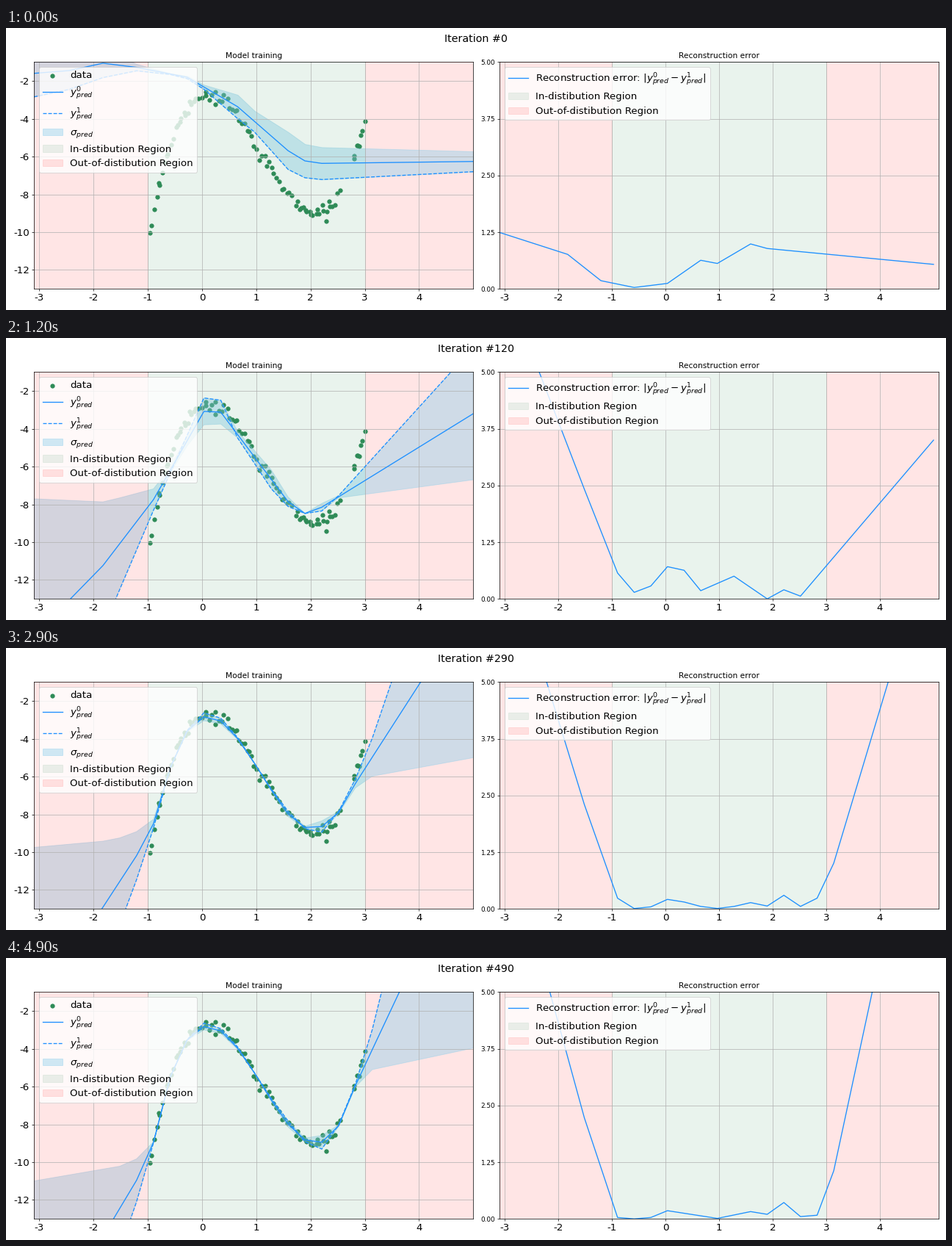
Write a matplotlib script that moves like this. It is 1280 px wide and 384 px high and loops after 5000 ms.

```python
import numpy as np
import matplotlib.pyplot as plt
from matplotlib.animation import FuncAnimation

FRAMES, STEP_MS = 50, 100
BLUE, GREEN, RED = "dodgerblue", "seagreen", "red"

plt.rcParams["font.family"] = "DejaVu Sans"
plt.rcParams["axes.unicode_minus"] = False

# The network is evaluated on 30 samples of [-4, 5]; the first two stay unseen
index = np.arange(2, 30)
grid = -4 + index * 9 / 29
inside = (grid > -0.7) & (grid < 1.8)


def cubic(x):
    """Curve behind the data: peak at 0.1, valley at 2.1."""
    return 4.65 * (x**3 / 3 - 1.1 * x**2 + 0.21 * x) - 2.85


def path(*points):
    """Polyline through (sample index, value) points."""
    return np.interp(index, *zip(*points))


def converged(x, low=-0.95, high=2.83):
    """The cubic where there is data, straight lines beyond it."""
    return (cubic(np.clip(x, low, high))
            + 4.8 * np.minimum(x - low, 0) + 6.1 * np.maximum(x - high, 0))


# Each stage: step, first prediction, signed gap to the second prediction
stages = [
    (0,
     path((2, -1.66), (5, -1.45), (7, -1.06), (9, -1.28), (12, -1.8),
          (15, -3.36), (18, -5.69), (19, -6.23), (20, -6.36), (29, -6.26)),
     path((2, -1.35), (7, -.76), (9, -.18), (11, -.03), (13, -.12),
          (15, -.63), (16, -.56), (18, -.99), (19, -.89), (29, -.54))),
    (3,
     path((2, -9.42), (7, -7.94), (10, -6.42), (13, -4.75), (14, -4.6),
          (15, -4.99), (18, -7.32), (19, -7.64), (29, -7.16)),
     path((2, -4.94), (8, -2.19), (10, -.99), (12, -.25), (14, .63),
          (15, .47), (16, .09), (17, 0), (29, .18))),
    (12,
     path((2, -15.8), (7, -11.24), (10, -7.75), (13, -3.08), (14, -3.12),
          (18, -7.86), (19, -8.48), (20, -8.15), (29, -3.2)),
     path((2, -8.13), (8, -2.42), (10, -.57), (13, .71), (14, .63),
          (15, -.18), (17, -.5), (19, 0), (20, -.2), (21, .06), (29, 3.5))),
    (49,
     converged(grid),
     path((2, -10.25), (8, -2.23), (10, -.03), (12, .03), (13, .18), (16, .01),
          (18, .16), (20, -.36), (21, .05), (22, .08), (23, 1.06),
          (29, 11.28))),
]
steps, means, gaps = zip(*stages)
log_steps = np.log1p(steps)


def predict(k):
    """Training slows down: blend over log time, faster where data exists."""
    u = np.log1p(k)
    j = min(np.searchsorted(log_steps, u, side="right"), len(steps) - 1)
    w = (u - log_steps[j - 1]) / (log_steps[j] - log_steps[j - 1])
    w = np.where(inside, 1 - (1 - w)**3, w)
    return ((1 - w) * means[j - 1] + w * means[j],
            (1 - w) * gaps[j - 1] + w * gaps[j])


# Noisy training samples, with a hole before the last cluster
rng = np.random.default_rng(4)
spans = [(-0.96, -0.07, 24), (0, 1.65, 37), (1.72, 2.53, 23), (2.78, 3, 8)]
data_x = np.concatenate([np.linspace(*s) for s in spans])
data_x[1:-1] += rng.normal(0, 0.012, len(data_x) - 2)
data_y = cubic(data_x) + rng.normal(0, 0.2, len(data_x))

fig = plt.figure(figsize=(20, 6), dpi=64)


def panel(left, title):
    ax = fig.add_axes([left / 1280, 28.8 / 384, 598.3 / 1280, 308.8 / 384])
    ax.set_title(title)
    ax.set_xticks(range(-3, 5))
    ax.tick_params(axis="x", labelsize=15)
    ax.grid(True)
    return ax


def regions(ax, xmax):
    ax.axvspan(-1, 3, color=GREEN, alpha=0.1, label="In-distibution Region")
    ax.axvspan(-3.1, -1, color=RED, alpha=0.1,
               label="Out-of-distibution Region")
    # the right span lies beneath the uncertainty band
    ax.axvspan(3, xmax, color=RED, alpha=0.1, zorder=0.9)
    ax.set_xlim(-3.1, xmax)
    ax.legend(loc="upper left", fontsize=15)


fit = panel(38, "Model training")
fit.scatter(data_x, data_y, color=GREEN, label="data")
line0, = fit.plot([], [], color=BLUE, label="$y^0_{pred}$")
line1, = fit.plot([], [], "--", color=BLUE, label="$y^1_{pred}$")
band = fit.fill_between(grid, 0 * grid, 0 * grid, color="skyblue", alpha=0.4,
                        label=r"$\sigma_{pred}$")
regions(fit, 5)
fit.set_ylim(-13, -1)
fit.set_yticks(range(-12, -1, 2))
fit.tick_params(axis="y", labelsize=15)

err = panel(672, "Reconstruction error")
err_line, = err.plot([], [], color=BLUE,
                     label="Reconstruction error: $|y^0_{pred} - y^1_{pred}|$")
regions(err, 5.1)
err.set_ylim(0, 5)
err.set_yticks(np.linspace(0, 5, 5))

heading = fig.suptitle("", fontsize=16)


def draw(k):
    y, gap = predict(k)
    sigma = np.abs(gap)
    line0.set_data(grid, y)
    line1.set_data(grid, y + gap)
    err_line.set_data(grid, sigma)
    band.set_verts([np.column_stack([np.r_[grid, grid[::-1]],
                                     np.r_[y + sigma, (y - sigma)[::-1]]])])
    heading.set_text(f"Iteration #{10 * k}")
    return line0, line1, band, err_line, heading


anim = FuncAnimation(fig, draw, frames=FRAMES, interval=STEP_MS, repeat=True,
                     repeat_delay=0, blit=False)
plt.show()
```
